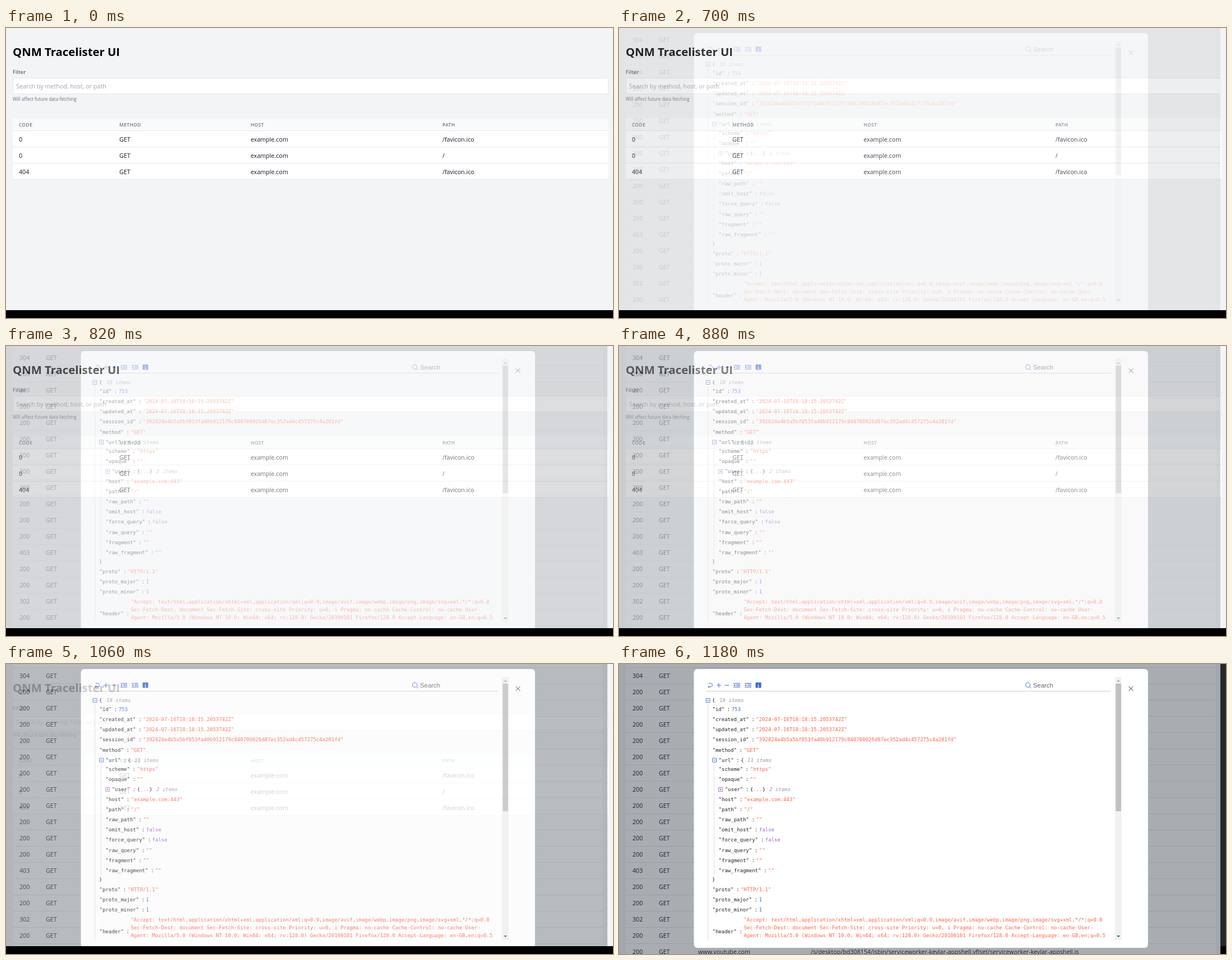
Recreate the animation shown at these times as an HTML page. Size 1082x518 px, loop 1.82 s.

```html
<!DOCTYPE html>
<html lang="en">
<head>
<meta charset="utf-8">
<title>Request viewer</title>
<style>
html, body { margin: 0; width: 100%; height: 100%; overflow: hidden; background: #000; }
svg { display: block; width: 1082px; height: 518px; }
text { white-space: pre; font: 10.7px "Open Sans", "Noto Sans", sans-serif; fill: #111827; }
.title { font-size: 20.3px; font-weight: 700; fill: #000; }
.label { font-size: 9.3px; font-weight: 600; fill: #5b6370; }
.hint { font-size: 8.1px; fill: #6b7280; }
.ghost { font-size: 10.8px; fill: #9ca3af; }
.head { font-size: 8.4px; font-weight: 600; letter-spacing: .42px; fill: #6b7280; }
.find { font: 11.4px "Liberation Sans", Arial, sans-serif; fill: #666; }
.mono { font: 9.01px "DejaVu Sans Mono", monospace; fill: #222; }
.str { fill: #ff6347; }
.num { fill: #4169e1; }
.bool { fill: #9a62d0; }
.note { fill: #999; font-style: italic; }
.icon { fill: none; stroke: #4169e1; stroke-width: 1; }
</style>
</head>
<body>
<svg id="stage" viewBox="0 0 1082 518">
  <defs><clipPath id="crop"><rect id="cropBox" width="1072" height="504"/></clipPath></defs>
  <g id="page"></g>
  <g id="detail" clip-path="url(#crop)"></g>
</svg>
<script>
const $ = id => document.getElementById(id);
const esc = s => s.replace(/&/g, '&amp;').replace(/</g, '&lt;');
const rect = (x, y, w, h, fill, more = '') =>
  `<rect x="${x}" y="${y}" width="${w}" height="${h}" fill="${fill}" ${more}/>`;
const text = (x, y, s, cls = '') => `<text x="${x}" y="${y}" class="${cls}">${esc(s)}</text>`;
const path = (d, more = 'class="icon"') => `<path d="${d}" ${more}/>`;
const hline = (x, y, w) => rect(x, y, w, 1, '#e5e7eb');

function buildPage() {
  const cols = [23, 202, 436, 778];
  const cells = (y, row, cls) => row.map((s, i) => text(cols[i], y, s, cls)).join('');
  const rows = [
    ['0', 'GET', 'example.com', '/favicon.ico'],
    ['0', 'GET', 'example.com', '/'],
    ['404', 'GET', 'example.com', '/favicon.ico']
  ];
  return rect(0, 0, 1082, 504, '#f3f4f6') +
    text(12, 50.4, 'QNM Tracelister UI', 'title') +
    text(12, 81.5, 'Filter', 'label') +
    rect(12.5, 89.5, 1061, 28, '#fff', 'rx="3" stroke="#e5e7eb"') +
    text(18, 108, 'Search by method, host, or path', 'ghost') +
    text(12, 130, 'Will affect future data fetching', 'hint') +
    rect(12, 161, 1062, 23, '#f9fafb') + rect(12, 184, 1062, 86, '#fff') +
    hline(12, 183, 1062) +
    cells(175.6, ['CODE', 'METHOD', 'HOST', 'PATH'], 'head') +
    rows.map((r, i) => cells(203 + 29 * i, r) + hline(12, 212 + 29 * i, 1062)).join('');
}

function buildList() {
  const codes = { 0: 304, 12: 403, 15: 302 };
  let out = rect(0, 0, 1072, 518, '#f3f4f6') + rect(12, 0, 1052, 518, '#fff');
  for (let i = 0; i < 18; i++) {
    const y = 25 + 29 * i;
    out += hline(12, y - 19, 1052) + text(24, y, String(codes[i] || 200)) + text(71, y, 'GET');
  }
  return out + text(141, 518, 'www.youtube.com') +
    text(342, 518, '/s/desktop/bd308154/jsbin/serviceworker-kevlar-appshell.vflset/serviceworker-kevlar-appshell.js') +
    rect(0, 0, 1072, 518, '#2a323c', 'opacity=".4"') +
    rect(1072, 0, 10, 504, '#24272b') + rect(1072, 504, 10, 14, '#000');
}

const CH = 5.424;
const mono = (x, y, s, cls = '') => text(x, y + 3.3, s, 'mono ' + cls);

function entry(level, y, key, value, cls) {
  const x = 155.4 + 11.1 * level, end = x + CH * (key.length + 2);
  return mono(x, y, `"${key}"`) + mono(end + 4.6, y, ':') +
    (value ? mono(end + 12.5, y, value, cls) : '');
}

function toggle(x, y, color, plus) {
  const d = `M${x - 3.5} ${y - 3.5}h7v7h-7zM${x - 2} ${y}h4` + (plus ? `M${x} ${y - 2}v4` : '');
  return path(d, `fill="none" stroke="${color}" stroke-width=".9"`);
}

function buildJson() {
  const stamp = '"2024-07-16T18:18:15.2053742Z"';
  const header = [
    '"Accept: text/html,application/xhtml+xml,application/xml;q=0.9,image/avif,image/webp,image/png,image/svg+xml,*/*;q=0.8',
    'Sec-Fetch-Dest: document Sec-Fetch-Site: cross-site Priority: u=0, i Pragma: no-cache Cache-Control: no-cache User-',
    'Agent: Mozilla/5.0 (Windows NT 10.0; Win64; x64; rv:128.0) Gecko/20100101 Firefox/128.0 Accept-Language: en-GB,en;q=0.5'
  ];
  const entries = [
    [1, 81, 'id', '753', 'num'],
    [1, 99, 'created_at', stamp, 'str'],
    [1, 117, 'updated_at', stamp, 'str'],
    [1, 135, 'session_id', '"392824e4b5a5bf853fa40b912179c840700026d87ec352ad4c457275c4a281fd"', 'str'],
    [1, 153.3, 'method', '"GET"', 'str'],
    [2, 171.6, 'url', '{'],
    [2, 187.5, 'scheme', '"https"', 'str'],
    [2, 205.7, 'opaque', '""', 'str'],
    [3, 224, 'user', '{   }'],
    [2, 242, 'host', '"example.com:443"', 'str'],
    [2, 260, 'path', '"/"', 'str'],
    [2, 278, 'raw_path', '""', 'str'],
    [2, 296, 'omit_host', 'false', 'bool'],
    [2, 314, 'force_query', 'false', 'bool'],
    [2, 332.3, 'raw_query', '""', 'str'],
    [2, 350.5, 'fragment', '""', 'str'],
    [2, 368.6, 'raw_fragment', '""', 'str'],
    [1, 403, 'proto', '"HTTP/1.1"', 'str'],
    [1, 421, 'proto_major', '1', 'num'],
    [1, 439, 'proto_minor', '1', 'num'],
    [1, 478, 'header']
  ];
  return rect(158, 72, 1, 421, '#ddd') + rect(169, 179, 1, 198, '#ddd') +
    toggle(158.5, 65, '#4169e1') + toggle(170, 171.7, '#4169e1') + toggle(181, 224, '#ad5fd0', true) +
    mono(166, 65, '{') + mono(179, 65, '18 items', 'note') +
    entries.map(e => entry(...e)).join('') +
    mono(229, 171.6, '11 items', 'note') +
    mono(239, 224, '...', 'str') + mono(268, 224, '2 items', 'note') +
    mono(166, 385, '}') +
    header.map((s, i) => mono(222.4, 457 + 14 * i, s, 'str')).join('');
}

function indentIcon(x) {
  return path(`M${x} 34.5h12M${x + 5} 36.8h7M${x + 5} 39h7M${x} 41.3h12`) +
    path(`M${x} 37.9l3.2 -2v4z`, 'fill="#4169e1"');
}

function buildModal() {
  const toolbar =
    path('M160 34.5h3.3a3.2 3.2 0 0 1 0 6.4h-4.5m2 -2l-2 2l2 2') +
    path('M174 38h8M178 34v8M188.5 38h8') +
    indentIcon(204) + indentIcon(224) +
    rect(243.5, 33, 10, 9.5, '#3565d8', 'rx="1"') +
    path('M248.5 34.8v1.4M247.6 37.4h1v3M247.2 40.6h2.8', 'fill="none" stroke="#fff"') +
    path('M733 37.3a4.2 4.2 0 1 1 -8.4 0a4.2 4.2 0 1 1 8.4 0M731.8 40.4l2.8 2.9') +
    text(738, 41.6, 'Search', 'find') + rect(155, 48, 722, 1, '#ccc');
  const scrollbar = rect(884, 23, 12, 470, '#f1f1f1') + rect(885.5, 35, 9.5, 228, '#c1c1c1') +
    path('M887.2 31.5h6l-3 -3z', 'fill="#a3a3a3"') + path('M887.2 485h6l-3 3z', 'fill="#505050"');
  return rect(133.5, 9, 809.5, 498, '#fff', 'rx="6"') + toolbar + buildJson() + scrollbar +
    path('M908.5 40l8 8m0 -8l-8 8', 'stroke="#333" fill="none"');
}

$('page').innerHTML = buildPage();
$('detail').innerHTML = buildList() + buildModal();

const LOOP = 1820, HOLD = 640, STEP = 60, STEPS = 10;

// The cross-fade moves in tenths; the last step also uncovers the whole stage.
function draw(now) {
  const t = now % LOOP;
  const k = t < HOLD ? 0 : Math.min(STEPS, Math.floor((t - HOLD) / STEP) + 1);
  const full = k === STEPS;
  $('detail').setAttribute('opacity', k / STEPS);
  $('cropBox').setAttribute('width', full ? 1082 : 1072);
  $('cropBox').setAttribute('height', full ? 518 : 504);
}

const start = performance.now();
function tick() {
  draw(performance.now() - start);
  requestAnimationFrame(tick);
}
tick();
</script>
</body>
</html>
```
